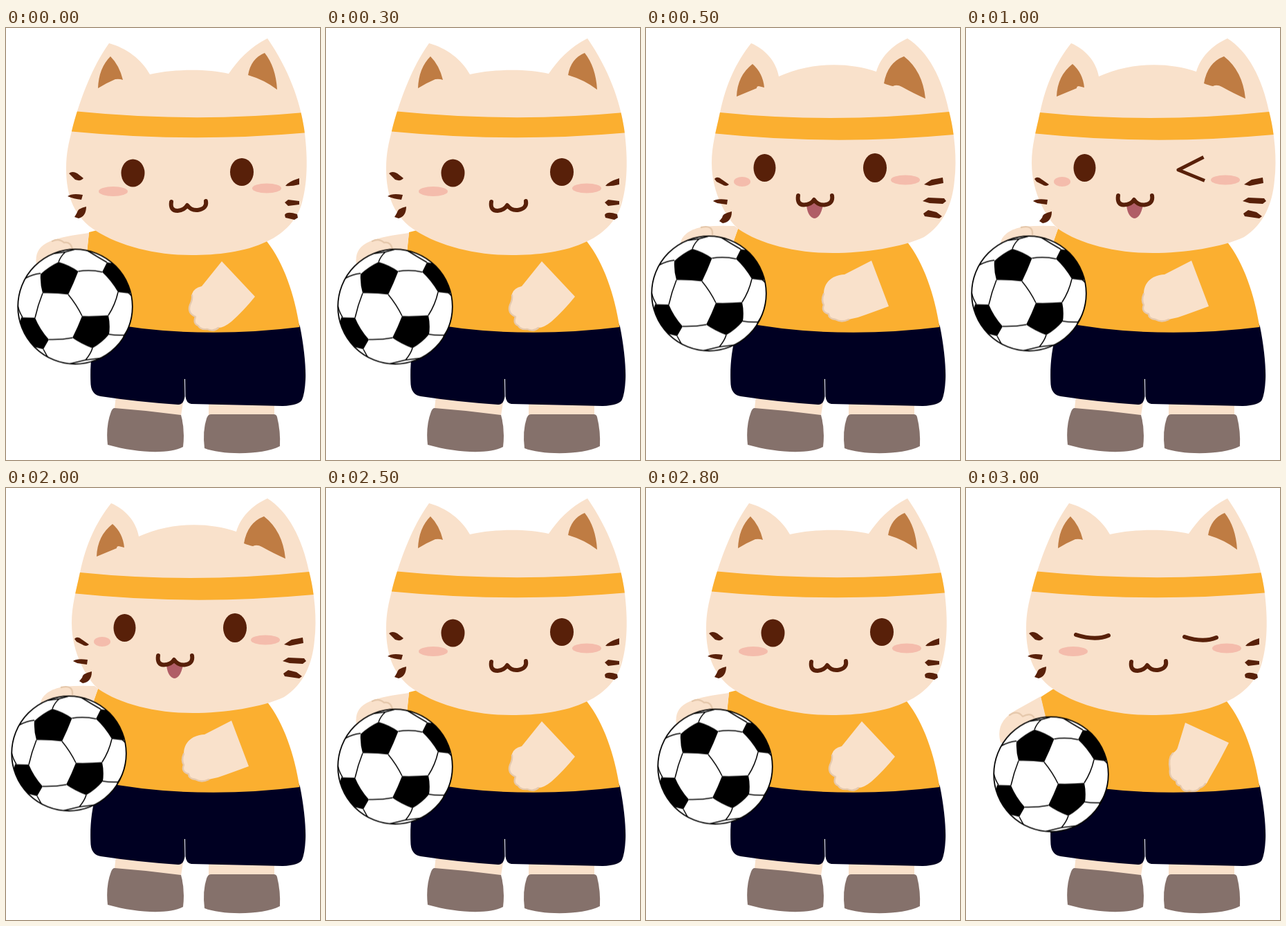
These frames come from a looping animation (454 px wide and 624 px high, 3.5 s). An HTML page:

```html
<!DOCTYPE html>
<html lang="en">
<head>
<meta charset="utf-8">
<title>Football cat</title>
<style>
  html, body { margin: 0; width: 100%; height: 100%; overflow: hidden; background: #fff; }
  svg { display: block; width: 100%; height: 100%; }

  .skin { fill: #f9e1cb; }
  .orange { fill: #fbaf30; }
  .navy { fill: #000022; }
  .shoe { fill: #85716b; }
  .ear { fill: #bf7c43; }
  .cheek { fill: #f4bcac; }
  .brown { fill: #582009; }
  .line { fill: none; stroke: #582009; stroke-width: 6; stroke-linecap: round; stroke-linejoin: round; }
  .fold { fill: none; stroke: #e6c9ad; stroke-width: 2.4; stroke-linecap: round; stroke-linejoin: round; }
  .seam { fill: none; stroke: #000; stroke-width: 1.5; }

  .calm, .happy, .open, .sleepy, .rest, .low, .look, .wink, .ball {
    animation: 3.5s step-end infinite;
  }
  .calm { animation-name: calm; }
  .happy { animation-name: happy; }
  .open, .rest { animation-name: rest; }
  .sleepy, .low { animation-name: low; }
  .look { animation-name: look; }
  .wink { animation-name: wink; stroke-width: 5; stroke-linecap: butt; }
  .ball { animation-name: ball; }

  @keyframes calm { 0%, 71.4285% { opacity: 1 } 14.2857% { opacity: 0 } }
  @keyframes happy { 0%, 71.4285% { opacity: 0 } 14.2857% { opacity: 1 } }
  @keyframes rest { 0%, 71.4285% { opacity: 1 } 14.2857%, 85.7142% { opacity: 0 } }
  @keyframes low { 0% { opacity: 0 } 85.7142% { opacity: 1 } }
  @keyframes look { 0%, 28.5714% { opacity: 0 } 14.2857%, 57.1428% { opacity: 1 } 71.4285% { opacity: 0 } }
  @keyframes wink { 0%, 57.1428% { opacity: 0 } 28.5714% { opacity: 1 } }
  @keyframes ball {
    0%, 71.4285% { transform: translate(100px, 402.5px) }
    14.2857% { transform: translate(91px, 383.5px) }
    85.7142% { transform: translate(123px, 413.5px) }
  }
</style>
</head>
<body>
<svg viewBox="0 0 454 624">
  <defs>
    <clipPath id="round"><circle r="83"/></clipPath>
    <path id="calmHead" d="M149 22C174 29 196 45 208 67C245 59 290 59 322 66C334 48 353 27 378 15C409 60 425 105 431 145C436 180 437 220 428 252C422 276 402 297 378 308C345 324 305 328 268 328C215 328 165 315 130 293C100 274 87 245 87 203C87 180 91 165 95 149C106 105 125 55 149 22Z"/>
    <path id="happyHead" d="M152 22C171 30 188 47 192 70C235 50 290 48 333 63C339 43 354 26 378 15C408 34 428 72 438 120C446 150 450 190 446 220C443 255 430 284 402 302C370 317 315 325 270 325C215 325 165 312 133 290C118 276 95 240 95 195C95 170 101 150 107 122C116 80 130 50 152 22Z"/>
    <clipPath id="calmClip"><use href="#calmHead"/></clipPath>
    <clipPath id="happyClip"><use href="#happyHead"/></clipPath>
  </defs>

  <!-- legs, shorts, shirt -->
  <path class="skin" d="M159 530L157 550 253 560 257 535ZM293 535V560H388V535Z"/>
  <path class="shoe" d="M157 549Q205 552.500 253 559Q259 580 256 605C235 616 190 614 147 602Q144 575 152 554Q154 549 157 549Z"/>
  <path class="shoe" d="M296 558H387Q391 558 392 562Q397 582 396 604C372 617 312 617 287 607Q284 582 290 564Q292 558 296 558Z"/>
  <path class="navy" d="M130 420H420L425 431C431 460 434 492 433 508Q432 528 428 537Q424 545 400 546L268 543Q260.500 542 259.500 532L259 507H258L258.500 532Q257 544 249 544Q190 540 137 532Q124 530 122.500 515C121 488 124 465 130 442Z"/>
  <path class="orange" d="M133 285H360L377 308C402 340 417 385 424.500 432Q270 451 133 424Z"/>

  <!-- arms -->
  <g class="rest">
    <path class="orange" d="M140 290L120 295 116 335 140 340Z"/>
    <path class="skin" d="M120 296C97 299 75 303 64 308C44 316 41 330 45 348L90 360 117 322Z"/>
    <path class="fold" d="M67 308Q76 303 84 310Q93 308 96 319"/>
    <path class="skin" d="M312 337L360 388Q344 408 326 424Q315 433 307 433Q300 439 291 435Q281 436 278 430Q270 427 274 417Q262 412 266 400Q269 392 269 384Q271 376 283 373Z"/>
    <path class="fold" d="M269 386Q270 392 266 400Q262 412 274 417Q270 427 278 430Q281 436 291 435Q300 439 307 433"/>
  </g>
  <g class="happy">
    <path class="orange" d="M140 288L133 290 127 307 133 330Z"/>
    <path class="skin" d="M128 286Q105 285 84 287C63 290 48 301 50 316L90 330 127 307 133 290Z"/>
    <path class="fold" d="M80 288Q97 284 96 298"/>
    <path class="skin" d="M326 336L351 402Q332 409 318 414Q306 419 293 421Q283 426 274 421Q264 420 264 413Q253 410 257 400Q253 393 257 384Q257 368 271 360Q280 356 287 356Z"/>
    <path class="fold" d="M257 384Q253 393 257 400Q253 410 264 413Q264 420 274 421Q283 426 293 421"/>
  </g>
  <g class="low">
    <path class="orange" d="M140 284L125 291 108 302 116 338 140 345Z"/>
    <path class="skin" d="M108 301Q90 311 72 321C53 332 44 346 50 368L95 370 116 334Z"/>
    <path class="fold" d="M63 328Q74 320 82 330Q93 324 98 331"/>
    <path class="skin" d="M317 339L380 368Q366 396 351 421Q347 431 338 433Q333 440 323 437Q314 440 310 430Q304 430 304 423Q293 419 295 406Q292 390 299 383Q305 379 306 375Z"/>
    <path class="fold" d="M299 383Q292 390 295 406Q293 419 304 423Q304 430 310 430Q314 440 323 437Q333 440 338 433Q343 432 346 427"/>
  </g>

  <g class="ball">
    <circle r="83" fill="#fff"/>
    <g clip-path="url(#round)">
      <path d="M-24-64.500Q-8-60 4.500-51Q-2-34-10-17.500Q-28-20-47-19.500Q-51-33-50-47Q-38-58-24-64.500Z
        M10 13.500Q30 14 48 12.500Q51 26 49 40Q39 52 25 60Q9 54-4 45Q4 29 10 13.500Z
        M46-64L39-50Q52-38 62-21L79-19 90-60 58-62Z
        M-78 15.500L-58 16Q-51 33-38 47.500L-46 61.500-60 58-84 40Z"/>
      <path class="seam" d="M4.500-51Q22-54 39-50M-10-17.500Q2-3 10 13.500M-47-19.500Q-54-2-58 16M-50-48Q-61-47-72-41
        M-24-64.500Q-21-73-14-79M-14-79L4-84M-14-79L-36-76M46-64Q32-72 16-82
        M62-21Q58-3 48 12.500M49 40Q62 42 71 41M71 41Q80 28 83 10M71 41L66 54M25 60Q22 69 15 77M15 77L-14 84M15 77L40 74
        M-4 45Q-20 48-38 47.500M-46 61.500L-38 76M-76 15.500Q-81 8-83-2M77-20L81-16"/>
    </g>
    <circle r="82.800" fill="none" stroke="#000" stroke-width="1.800"/>
  </g>

  <!-- calm head -->
  <g class="calm">
    <use href="#calmHead" class="skin"/>
    <path class="orange" clip-path="url(#calmClip)" d="M80 118L103 120.500Q270 137 431 122L445 120V151L431 151.500Q265 166 95 149.500L80 148Z"/>
    <path class="ear" d="M151 41Q134 58 133 87Q146 79 158 74Q164 73 169 75Q164 54 151 41Z"/>
    <path class="ear" d="M374 36Q354 44 350 68Q374 75 392 89Q390 56 374 36Z"/>
    <ellipse class="cheek" cx="155" cy="236" rx="21" ry="7"/>
    <ellipse class="cheek" cx="377" cy="231.500" rx="21" ry="7"/>
    <path class="line" d="M239 251Q237 264 248 264Q258 263 262 256Q268 264 277 263Q291 261 289 250"/>
    <path class="brown" d="M91 210Q96 206 103 210L112 217Q108 222 100 219ZM89 243Q96 238 111 241L109 248Q98 247 89 243Z
      M404 228Q408 222 424 217V226Q412 229 404 228ZM403 252L408 248 424 250V255L408 257ZM403 270Q406 264 421 269L422 274 417 277 404 274Z
      M116 258Q104 260 102 268L99 273 105 275Q116 272 116 258Z"/>
  </g>
  <g class="open brown">
    <ellipse cx="183.500" cy="209.500" rx="17" ry="20"/>
    <ellipse cx="341" cy="208" rx="17" ry="20"/>
  </g>
  <path class="sleepy line" d="M159 212Q187 221 206 213M316 215Q343 224 362 216"/>

  <!-- happy head -->
  <g class="happy">
    <use href="#happyHead" class="skin"/>
    <path class="orange" clip-path="url(#happyClip)" d="M90 120L107 122Q270 138.500 438 121L454 119V153L445 154Q270 170 101 152.500L90 152Z"/>
    <path class="ear" d="M154 52Q132 69 131 99L160 87Q160 84 163 84L171 86Q169 65 154 52Z"/>
    <path class="ear" d="M373 41Q349 50 344 80Q352 83 357 84Q363 81 370 85Q388 95 404 102Q400 62 373 41Z"/>
    <ellipse class="brown" cx="171.500" cy="202" rx="16" ry="20"/>
    <ellipse class="cheek" cx="139" cy="222" rx="12" ry="7"/>
    <ellipse class="cheek" cx="375" cy="219.500" rx="21" ry="7"/>
    <path fill="#b05d66" d="M232 256L243 249 256 256Q252 275 243 275Q234 273 232 256Z"/>
    <path class="line" d="M220 242Q218 255 228 255.500Q239 255 243 248Q248 256 258 255.500Q271 254 269 242"/>
    <path class="brown" d="M99 218Q103 213 110 219L120 226Q116 230 110 226L102 222ZM97 250Q102 246 118 248L117 255 103 253Z
      M402 226L413 219 429 216 430 224 410 228ZM400 250L408 245 431 246 434 250 429 254 410 253ZM401 268L408 263 420 266 428 272 424 275 403 272Z
      M124 265Q110 268 110 274L106 279 111 282Q124 280 124 265Z"/>
  </g>
  <ellipse class="look brown" cx="331" cy="202" rx="17" ry="21"/>
  <path class="wink line" d="M343.500 186.500L307 205 345 220.500"/>
</svg>
</body>
</html>
```
